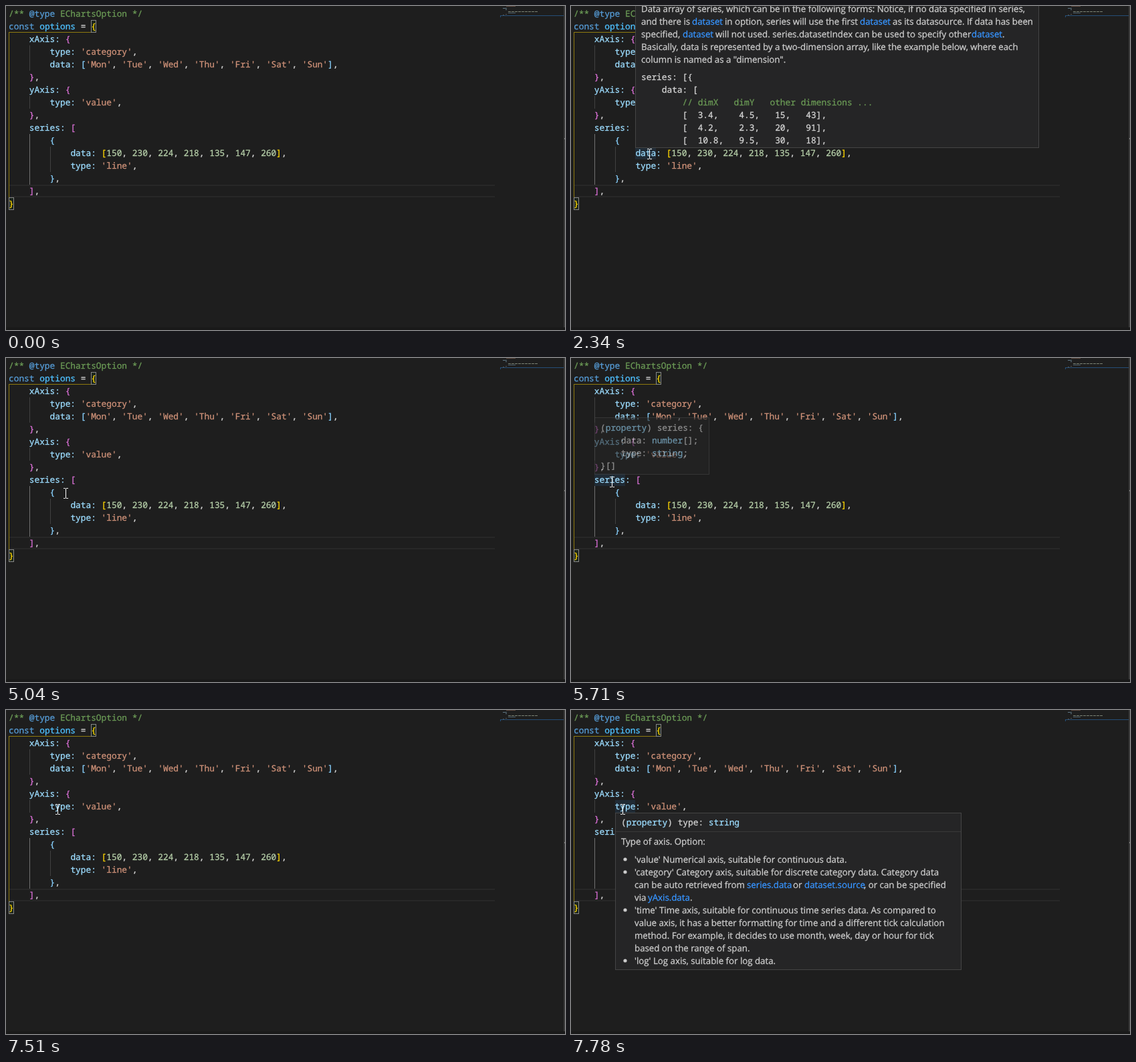
Write an HTML page that moves like this. It is 836 by 486 pixels and loops after 8 s.

```html
<!DOCTYPE html>
<html lang="en">
<head>
<meta charset="utf-8">
<title>Editor hover hints</title>
<style>
  html, body { margin: 0; width: 100%; height: 100%; overflow: hidden; background: #1e1e1e; }
  svg { display: block; }
  text, tspan { fill: currentColor; stroke: currentColor; stroke-width: .3px; }
  text { text-rendering: geometricPrecision; }
  .code { font: 12.83px "Noto Sans Mono", monospace; }
  .prose { font: 13.28px "Open Sans", sans-serif; }
  rect, .cursor { shape-rendering: crispEdges; }
</style>
</head>
<body>
<svg id="stage" width="836" height="486" viewBox="0 0 836 486"></svg>
<script>
const LOOP = 8000, CHAR = 7.698, LINE = 19;
const PLAIN = '#d4d4d4', KEY = '#9cdcfe', BLUE = '#569cd6', GREEN = '#6a9955';
const PROSE = '#ccc', LINK = '#3794ff';
const BRACKETS = ['#ffd700', '#da70d6', '#87cefa'];
const stage = document.getElementById('stage');

function add(parent, tag, attrs, text) {
  const el = document.createElementNS('http://www.w3.org/2000/svg', tag);
  for (const name in attrs) el.setAttribute(name, attrs[name]);
  if (text) el.textContent = text;
  parent.append(el);
  return el;
}
const box = (parent, x, y, width, height, fill) => add(parent, 'rect', { x, y, width, height, fill });
const frame = (parent, x, y, width, height, fill, stroke) =>
  add(parent, 'rect', { x: x + .5, y: y + .5, width: width - 1, height: height - 1, fill, stroke });

// Monospaced lines, coloured by the first rule that fits at each position
let depth = 0;
const open = () => BRACKETS[depth++ % 3];
const close = () => BRACKETS[--depth % 3];
const editorRules = [
  [/@type|const/y, BLUE], [/\/\*\*|EChartsOption \*\//y, GREEN], [/'[^']*'/y, '#ce9178'],
  [/options/y, '#4fc1ff'], [/[a-z]+:/yi, KEY], [/\d+/y, '#b5cea8'],
  [/[[{]/y, open], [/[\]}]/y, close], [/\S/y, PLAIN]
];
const hintRules = [
  [/\/\/|dim\w+|other|\.{3}/y, GREEN], [/property|string|number/y, KEY],
  [/[a-z]+:/y, PLAIN], [/[\d.]+/y, PLAIN], [/\S/y, PLAIN]
];
function code(parent, x, y, lines, rules) {
  lines.forEach((line, row) => {
    const text = add(parent, 'text', { class: 'code', y: y + row * LINE });
    for (let col = 0; col < line.length;) {
      let size = 1;
      for (const [pattern, colour] of rules) {
        pattern.lastIndex = col;
        const hit = pattern.exec(line);
        if (!hit) continue;
        size = hit[0].length;
        const color = typeof colour === 'function' ? colour() : colour;
        add(text, 'tspan', { x: x + col * CHAR, color }, hit[0]);
        break;
      }
      col += size;
    }
  });
}

// Prose runs as [x, text]; a leading "@" marks a link
function prose(parent, y, ...runs) {
  for (const [x, words] of runs) {
    const link = words[0] === '@';
    add(parent, 'text', { class: 'prose', x, y, color: link ? LINK : PROSE }, link ? words.slice(1) : words);
  }
}

// Editor background, current line and guides
box(stage, 0, 0, 836, 486, '#1e1e1e');
box(stage, 4, 268, 727, 2, '#282828');
box(stage, 4, 285, 727, 2, '#282828');
for (const [x, y, h, fill] of [
  [35, 59, 38, '#404040'], [35, 135, 19, '#404040'],
  [35, 192, 76, '#707070'], [66, 211, 38, '#404040']
]) box(stage, x, y, 1, h, fill);
box(stage, 4, 39, 1, 248, '#8e7a0f');
box(stage, 4, 39, 130, 1, '#8e7a0f');
frame(stage, 127, 21, 8, 19, '#1c251c', '#888');
frame(stage, 4, 287, 8, 19, '#1c251c', '#888');

const wordMark = (x, y, w) => box(stage, x, y, w, LINE, 'rgba(38,79,120,.25)');
const marks = [wordMark(96, 211, 31), wordMark(35, 173, 46), wordMark(66, 135, 30)];

code(stage, 4, 16, [
  '/** @type EChartsOption */',
  'const options = {',
  '    xAxis: {',
  "        type: 'category',",
  "        data: ['Mon', 'Tue', 'Wed', 'Thu', 'Fri', 'Sat', 'Sun'],",
  '    },',
  '    yAxis: {',
  "        type: 'value',",
  '    },',
  '    series: [',
  '        {',
  '            data: [150, 230, 224, 218, 135, 147, 260],',
  "            type: 'line',",
  '        },',
  '    ],',
  '}'
], editorRules);

// Minimap and window edges
for (const [x, y, w, fill] of [
  [748, 0, 14, '#5d4a40'], [743, 3, 6, '#5f7784'], [747, 5, 2, '#5f7784'],
  [751, 10, 11, '#50606a'], [747, 12, 2, '#555'], [743, 13, 2, '#555']
]) box(stage, x, y, w, 1, fill);
for (let x = 751; x < 792; x += 5) box(stage, x, 8, 4, 1, '#7a8274');
box(stage, 740, 14, 94, 1, '#264f78');
box(stage, 739, 14, 1, 3, '#264f78');
box(stage, 834, 0, 2, 486, '#3a3a3a');
box(stage, 835, 198, 1, 2, '#808080');
box(stage, 0, 482, 836, 4, '#191919');

function hint(x, y, w, h) {
  const g = add(stage, 'g', {});
  frame(g, x, y, w, h, '#252526', '#454545');
  return g;
}

const dataHint = hint(96, -6, 604, 219);
prose(dataHint, 9, [105, 'Data array of series, which can be in the following forms: Notice, if no data specified in series,']);
prose(dataHint, 28, [105, 'and there is'], [181, '@dataset'], [230, 'in option, series will use the first'],
  [432, '@dataset'], [481, 'as its datasource. If data has been']);
prose(dataHint, 47, [105, 'specified,'], [167, '@dataset'],
  [216, 'will not used. series.datasetIndex can be used to specify other'], [599, '@dataset'], [645, '.']);
prose(dataHint, 66, [105, 'Basically, data is represented by a two-dimension array, like the example below, where each']);
prose(dataHint, 85, [105, 'column is named as a "dimension".']);
code(dataHint, 105, 111, [
  'series: [{',
  '    data: [',
  '        // dimX   dimY   other dimensions ...',
  '        [  3.4,    4.5,   15,   43],',
  '        [  4.2,    2.3,   20,   91],',
  '        [  10.8,   9.5,   30,   18],'
], hintRules);

const seriesHint = hint(35, 89, 172, 86);
code(seriesHint, 44, 109, [
  '(property) series: {',
  '    data: number[];',
  '    type: string;',
  '}[]'
], hintRules);

const typeHint = hint(66, 154, 518, 236);
code(typeHint, 75, 173, ['(property) type: string'], hintRules);
box(typeHint, 67, 182, 516, 1, '#393939');
prose(typeHint, 202, [75, 'Type of axis. Option:']);
[
  [[95, "'value' Numerical axis, suitable for continuous data."]],
  [[95, "'category' Category axis, suitable for discrete category data. Category data"]],
  [[95, 'can be auto retrieved from'], [263, '@series.data'], [332, 'or'],
    [349, '@dataset.source'], [438, ', or can be specified']],
  [[95, 'via'], [115, '@yAxis.data'], [178, '.']],
  [[95, "'time' Time axis, suitable for continuous time series data. As compared to"]],
  [[95, 'value axis, it has a better formatting for time and a different tick calculation']],
  [[95, 'method. For example, it decides to use month, week, day or hour for tick']],
  [[95, 'based on the range of span.']],
  [[95, "'log' Log axis, suitable for log data."]]
].forEach((runs, i) => {
  const y = 229 + i * LINE;
  prose(typeHint, y, ...runs);
  if (runs[0][1][0] === "'") add(typeHint, 'circle', { cx: 81, cy: y - 5, r: 2.6, fill: PROSE });
});

const cursor = add(stage, 'path', {
  class: 'cursor', fill: '#fff',
  d: 'M0 0h3v1h-3zM4 0h3v1h-3zM3 1h1v14h-1zM0 15h3v1h-3zM4 15h3v1h-3z'
});

// Pointer steps: time, left, top
const path = [
  [900, 111, 428], [1020, 112, 394], [1140, 112, 358], [1290, 109, 312], [1410, 105, 279],
  [1560, 111, 257], [1680, 115, 239], [1830, 115, 230], [1950, 115, 223], [2070, 114, 217],
  [2190, 114, 214], [4490, 111, 213], [4770, 106, 211], [4890, 98, 206], [5040, 86, 195],
  [5160, 77, 190], [5310, 66, 184], [5430, 58, 178], [6450, 55, 184], [6570, 54, 192],
  [6720, 53, 195], [6970, 55, 182], [7090, 59, 168], [7240, 68, 153], [7360, 74, 142], [7510, 74, 141]
];
// Hint opacity steps: time, opacity
const hints = [
  [dataHint, [[2340, 1], [5040, 0]]],
  [seriesHint, [[5710, .6], [5860, 1], [6570, 0]]],
  [typeHint, [[7630, .3], [7780, 1]]]
];
const stepAt = (steps, t) => steps.filter(step => step[0] <= t).pop();

function draw() {
  const t = performance.now() % LOOP;
  const spot = stepAt(path, t);
  cursor.setAttribute('visibility', spot ? 'visible' : 'hidden');
  if (spot) cursor.setAttribute('transform', `translate(${spot[1]} ${spot[2]})`);
  hints.forEach(([el, steps], i) => {
    const step = stepAt(steps, t), opacity = step ? step[1] : 0;
    el.setAttribute('opacity', opacity);
    marks[i].setAttribute('visibility', opacity ? 'visible' : 'hidden');
  });
  requestAnimationFrame(draw);
}
draw();
</script>
</body>
</html>
```
